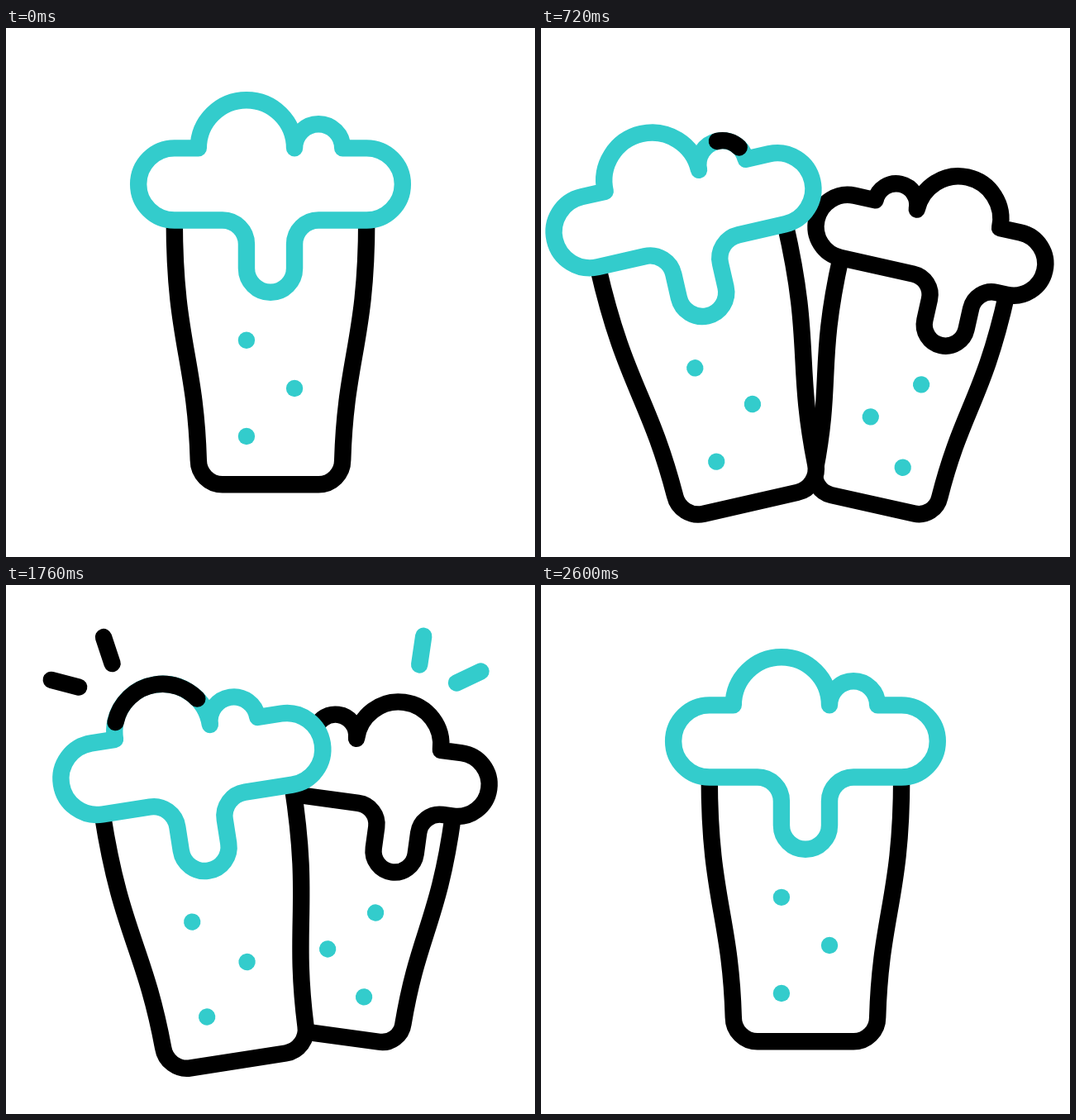
An HTML page with a canvas for the animation above (3000 ms loop, 640 by 640 pixels).

```html
<!DOCTYPE html>
<html lang="en">
<head>
<meta charset="utf-8">
<title>Cheers</title>
<style>
  html, body { margin: 0; width: 100%; height: 100%; overflow: hidden; background: #fff; }
  canvas { display: block; width: 640px; height: 640px; }
</style>
</head>
<body>
<canvas id="stage" width="640" height="640"></canvas>
<script>
const ctx = document.getElementById('stage').getContext('2d');
const TEAL = '#33cccc', BLACK = '#000';
const LOOP = 3000, STEP = 40, STROKE = 20.4;
const FRONT_UNIT = 14.53, BACK_UNIT = 12.85;
const RETURN = 2018;

// Shapes are in grid units around the glass centre; the foam starts on top of its small bump.
const foamPath = drip => new Path2D(
  `M4-14A2 2 0 0 1 6-12H8A3 3 0 0 1 8-6H${4 + drip}
   a2 2 0 0 0 -2 2v2a2 2 0 0 1 -4 0v-2a2 2 0 0 0 -2-2
   H-8A3 3 0 0 1-8-12H-6A4 4 0 0 1 2-12A2 2 0 0 1 4-14Z`);
const FOAM_LENGTH = 16 * Math.PI + 16;
const frontFoam = foamPath(0), backFoam = foamPath(-3);
const glass = new Path2D(
  'M-8-6C-8 4-6.25 5.5-6 14A2 2 0 0 0-4 16H4A2 2 0 0 0 6 14C6.25 5.5 8 4 8-6');
const bubbles = [[-2, 4], [2, 8], [-2, 12]];
const frontSparks = [[-5.26, -18.28, -5.8, -21.5], [-8.31, -16.77, -11.38, -18.1]];
const backSparks = [[-2.93, -19.69, -2.97, -24.1], [-6.62, -18.47, -10.05, -20.7]];

const mix = (a, b, k) => a + (b - a) * k;
const progress = (t, start, length) => Math.min(1, Math.max(0, (t - start) / length));
const smooth = p => p * p * (3 - 2 * p);

// Cubic bezier (.33, 0, .2, 1)
function ease(p) {
  let low = 0, high = 1;
  for (let i = 0; i < 24; i++) {
    const s = (low + high) / 2, r = 1 - s;
    if (s * r * r + 0.6 * s * s * r + s * s * s < p) low = s; else high = s;
  }
  return p <= 0 ? 0 : p >= 1 ? 1 : smooth(low);
}
const eased = (t, start, length) => ease(progress(t, start, length));

// Each move is [start, length, target]
const track = (t, initial, ...moves) =>
  moves.reduce((value, [start, length, target]) => mix(value, target, eased(t, start, length)), initial);

function strokeWith(path, color) {
  ctx.strokeStyle = color;
  ctx.stroke(path);
}

function drawGlass(unit, foam, foamColor) {
  ctx.lineWidth = STROKE / unit;
  ctx.lineJoin = 'round';
  ctx.lineCap = 'butt';
  ctx.fillStyle = '#fff';
  ctx.fill(glass);
  strokeWith(glass, BLACK);
  ctx.fill(foam);
  strokeWith(foam, foamColor);
  ctx.fillStyle = TEAL;
  for (const [x, y] of bubbles) {
    ctx.beginPath();
    ctx.arc(x, y, STROKE / 2 / unit, 0, 7);
    ctx.fill();
  }
  ctx.lineCap = 'round';
}

function drawSparks(t, sparks, color, start, reach) {
  const out = eased(t, 1790, 520);
  const end = mix(reach * eased(t, start, 600), 1, out);
  if (t <= start || out >= 1) return;
  ctx.strokeStyle = color;
  for (const [x1, y1, x2, y2] of sparks) {
    ctx.beginPath();
    ctx.moveTo(mix(x1, x2, out), mix(y1, y2, out));
    ctx.lineTo(mix(x1, x2, end), mix(y1, y2, end));
    ctx.stroke();
  }
}

function drawFoamSweep(t) {
  const from = smooth(progress(t, 804, 1366));
  const to = 0.9 * eased(t, 658, 655) + 0.1 * smooth(progress(t, 1630, 540));
  if (to <= from) return;
  ctx.setLineDash([(to - from) * FOAM_LENGTH, FOAM_LENGTH]);
  ctx.lineDashOffset = -from * FOAM_LENGTH;
  strokeWith(frontFoam, BLACK);
  ctx.setLineDash([]);
}

function place(x, y, degrees) {
  ctx.translate(x, y);
  ctx.rotate(degrees * Math.PI / 180);
}

function draw(t) {
  const frontTrack = (peak, settled) =>
    track(t, 0, [110, 600, peak], [708, 600, settled], [RETURN, 600, 0]);
  const backTrack = (start, rest, peak, settled) =>
    track(t, rest, [start, 790 - start, peak], [790, 600, settled], [RETURN, 600, rest]);

  ctx.setTransform(1, 0, 0, 1, 0, 0);
  ctx.fillStyle = '#fff';
  ctx.fillRect(0, 0, 640, 640);
  place(320 + frontTrack(-118.4, -75), 319.7 + frontTrack(28.5, 26), frontTrack(-12.9, -8.86));

  // The back glass rides on the front one and stays hidden behind it at rest.
  const apart = backTrack(296, 0, 235, 181.9);
  if (apart > 5) {
    ctx.save();
    place(apart, backTrack(350, 3, 82.5, 24.7), backTrack(296, -1.7, 25.8, 16.66));
    ctx.scale(-BACK_UNIT, BACK_UNIT);
    drawGlass(BACK_UNIT, backFoam, BLACK);
    drawSparks(t, backSparks, TEAL, 1086, 0.62);
    ctx.restore();
  }

  ctx.scale(FRONT_UNIT, FRONT_UNIT);
  drawGlass(FRONT_UNIT, frontFoam, TEAL);
  drawFoamSweep(t);
  drawSparks(t, frontSparks, BLACK, 770, 0.71);
}

function tick() {
  const t = performance.now() % LOOP;
  draw(Math.floor(t / STEP) * STEP);
  requestAnimationFrame(tick);
}
tick();
</script>
</body>
</html>
```
